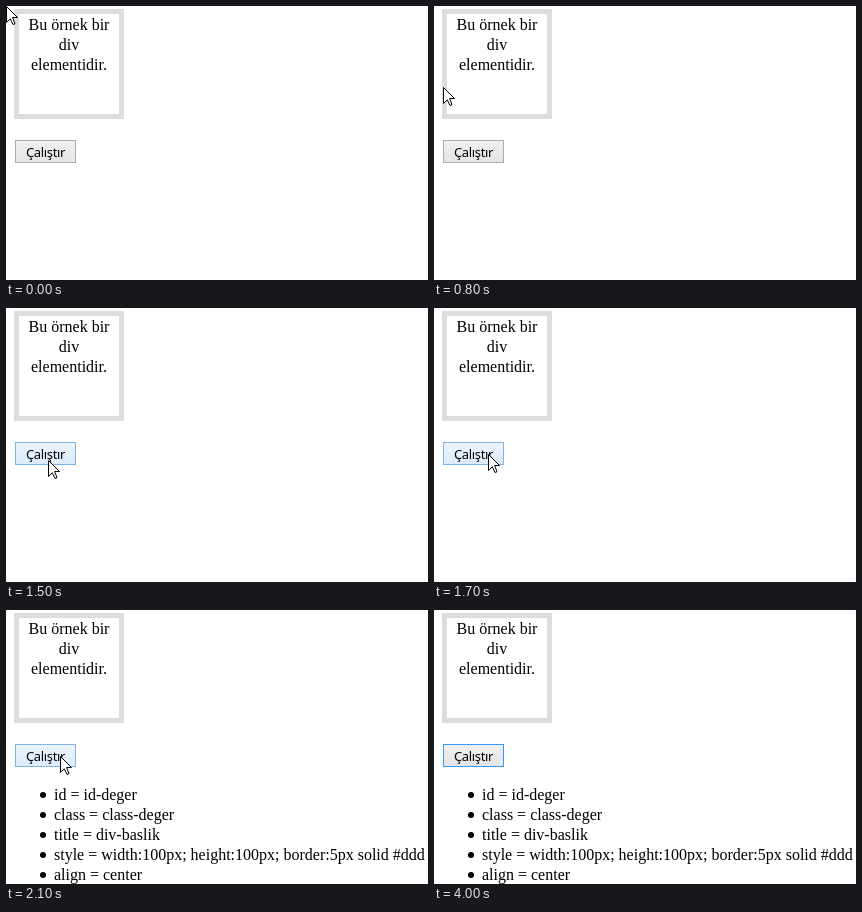
These frames come from a looping animation (422 px wide and 274 px high, 4400 ms). An HTML page with a canvas:

```html
<!DOCTYPE html>
<html lang="tr">
<head>
<meta charset="utf-8">
<title>Div özellikleri</title>
<style>
  html, body { margin: 0; width: 100%; height: 100%; overflow: hidden; background: #fff; }
  canvas { display: block; }
</style>
</head>
<body>
<canvas id="stage" width="422" height="274"></canvas>
<script>
const ctx = document.getElementById('stage').getContext('2d');
const LOOP = 4400;
const SERIF = '16px "Liberation Serif", "Times New Roman", serif';
const SANS = '13px "Noto Sans", Tahoma, sans-serif';

const BOX_LINES = ['Bu örnek bir', 'div', 'elementidir.'];
const ATTRIBUTES = [
  'id = id-deger',
  'class = class-deger',
  'title = div-baslik',
  'style = width:100px; height:100px; border:5px solid #ddd',
  'align = center'
];

// Button looks: border, gradient top, gradient bottom
const LOOKS = {
  normal: ['#acacac', '#f0f0f0', '#e5e5e5'],
  hover: ['#7eb4ea', '#ecf4fc', '#dcecfc'],
  pressed: ['#569de5', '#daecfc', '#c4e0fc'],
  focused: ['#3399ff', '#f0f0f0', '#e5e5e5']
};

// The pointer jumps: start time, x, y
const POINTER = [
  [0, 0, 0], [600, 2, 12], [700, 4, 45], [800, 9, 81], [900, 17, 108],
  [1000, 26, 127], [1100, 32, 138], [1200, 36, 149], [1300, 38, 156],
  [1500, 42, 152], [1600, 49, 148], [1700, 54, 146], [3600, 39, 166],
  [3700, 27, 197], [3800, 14, 231], [3900, 3, 260], [4000, null, null]
];

const BUTTON = [
  [0, 'normal'], [1100, 'hover'], [2000, 'pressed'], [2100, 'hover'], [3700, 'focused']
];

const LIST_START = 2100;

function stepAt(steps, t) {
  let current = steps[0];
  for (const step of steps) if (step[0] <= t) current = step;
  return current;
}

function write(text, x, y, font, align = 'left', spacing = '0px') {
  ctx.font = font;
  ctx.textAlign = align;
  ctx.letterSpacing = spacing;
  ctx.fillStyle = '#000';
  ctx.fillText(text, x, y);
}

function drawBox() {
  ctx.strokeStyle = '#ddd';
  ctx.lineWidth = 5;
  ctx.strokeRect(10.5, 5.5, 105, 105);
  BOX_LINES.forEach((line, i) => write(line, 63, 24 + i * 20, SERIF, 'center'));
}

function drawButton(state) {
  const [border, top, bottom] = LOOKS[state];
  const fill = ctx.createLinearGradient(0, 135, 0, 156);
  fill.addColorStop(0, top);
  fill.addColorStop(1, bottom);
  ctx.fillStyle = fill;
  ctx.fillRect(9, 134, 61, 23);
  ctx.strokeStyle = border;
  ctx.lineWidth = 1;
  ctx.strokeRect(9.5, 134.5, 60, 22);
  write('Çalıştır', state === 'pressed' ? 21 : 20, 151, SANS, 'left', '-0.35px');
}

function drawList() {
  ATTRIBUTES.forEach((line, i) => {
    const y = 190 + i * 20;
    ctx.fillStyle = '#000';
    ctx.beginPath();
    ctx.arc(37, y - 5, 3, 0, Math.PI * 2);
    ctx.fill();
    write(line, 48, y, SERIF);
  });
}

const arrow = new Path2D('M.5 .5V16.5L4.3 12.8L7 18.5L9 17.7L6.6 11.5H11.5Z');

function drawPointer(x, y) {
  ctx.save();
  ctx.translate(x, y);
  ctx.fillStyle = '#fff';
  ctx.strokeStyle = '#000';
  ctx.lineWidth = 1;
  ctx.fill(arrow);
  ctx.stroke(arrow);
  ctx.restore();
}

function draw(t) {
  ctx.fillStyle = '#fff';
  ctx.fillRect(0, 0, 422, 274);
  drawBox();
  drawButton(stepAt(BUTTON, t)[1]);
  if (t >= LIST_START) drawList();
  const [, x, y] = stepAt(POINTER, t);
  if (x !== null) drawPointer(x, y);
}

const start = performance.now();
function tick() {
  draw((performance.now() - start) % LOOP);
  requestAnimationFrame(tick);
}
tick();
</script>
</body>
</html>
```
